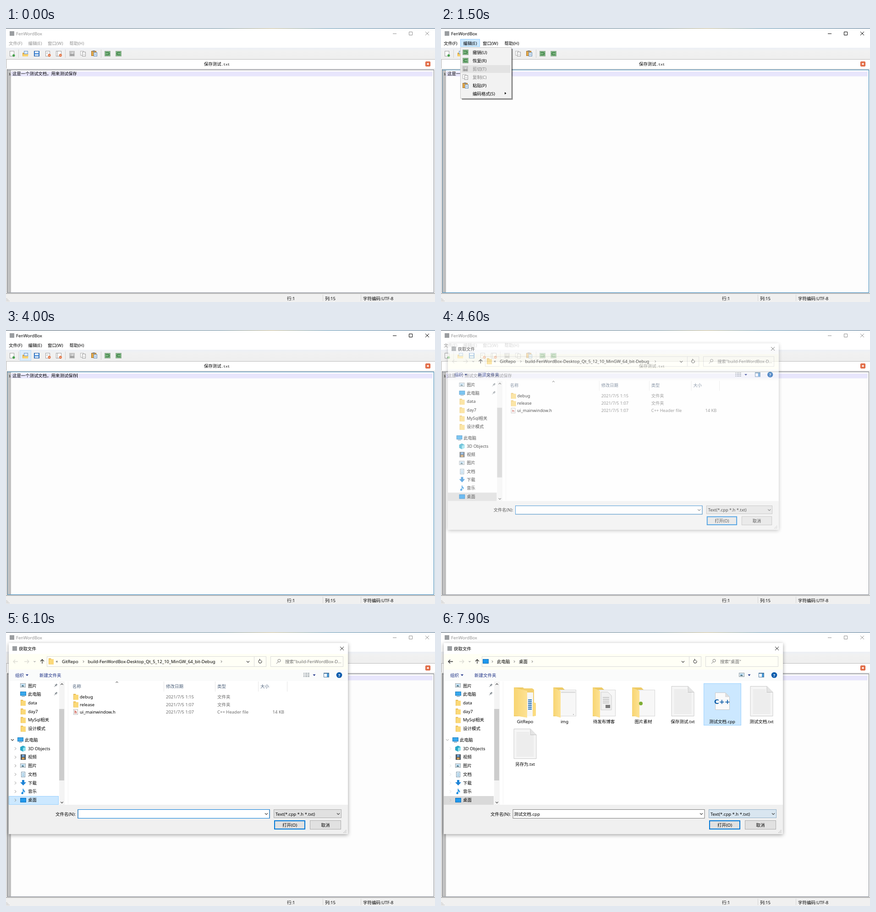
Write an HTML page that moves like this. It is 936 px wide and 598 px high and loops after 8 s.

```html
<!DOCTYPE html>
<html lang="zh-CN">
<head>
<meta charset="utf-8">
<title>FenWordBox</title>
<style>
html, body { margin: 0; width: 100%; height: 100%; overflow: hidden; background: #fff; }
svg { display: block; width: 936px; height: 598px; }
text { font: 9.5px "Noto Sans", "Noto Sans CJK SC", "Noto Sans CJK", sans-serif; white-space: pre; }
.sun { font: 9.4px "Noto Sans CJK SC", "Noto Sans CJK", sans-serif; font-weight: 500; }
.mono { font: 7.83px "Liberation Mono", monospace; }
.cpp { font: bold 14.5px "DejaVu Sans", sans-serif; }
#win { color: #929292; }
#frame { stroke: #828790; }
.active #win { color: #000; }
.active #frame { stroke: #2f80b4; }
#pick { fill: #d9d9d9; stroke: #d9d9d9; }
.picked #pick { fill: #cce8ff; stroke: #99d1ff; }
</style>
</head>
<body>
<script>
const LOOP = 8000;

// Drawing helpers: y of a text is the middle of its line
const text = (x, y, s, fill = '#000', extra = '') =>
  `<text x="${x}" y="${y + 3.5}" fill="${fill}" ${extra}>${s}</text>`;
const mid = (x, y, s, fill) => text(x, y, s, fill, 'text-anchor="middle"');
const rect = (x, y, w, h, fill, extra = '') =>
  `<rect x="${x}" y="${y}" width="${w}" height="${h}" fill="${fill}" ${extra}/>`;
const box = (x, y, w, h, fill, stroke, extra = '') =>
  rect(x + .5, y + .5, w - 1, h - 1, fill, `stroke="${stroke}" ${extra}`);
const path = (d, stroke, w = 1, fill = 'none') =>
  `<path d="${d}" stroke="${stroke}" stroke-width="${w}" fill="${fill}"/>`;
const shape = (d, fill) => `<path d="${d}" fill="${fill}"/>`;
const dot = (x, y, r, fill) => `<circle cx="${x}" cy="${y}" r="${r}" fill="${fill}"/>`;
const group = (id, body, extra = '') => `<g id="${id}" ${extra}>${body}</g>`;
const use = (id, x, y) => `<use href="#${id}" x="${x}" y="${y}"/>`;
const right = (x, y, c = '#555', r = 2.2) => path(`M${x - r / 2} ${y - r}l${r} ${r}l${-r} ${r}`, c);
const down = (x, y, c = '#444', r = 3) => path(`M${x - r} ${y - r / 2}l${r} ${r}l${r} ${-r}`, c, 1.1);
const up = (x, y, c = '#444', r = 3) => path(`M${x - r} ${y + r / 2}l${r} ${-r}l${r} ${r}`, c, 1.1);
const cross = (x, y, r, c, w = 1) => path(`M${x - r} ${y - r}l${2 * r} ${2 * r}m0 ${-2 * r}l${-2 * r} ${2 * r}`, c, w);
const caretDown = (x, y) => shape(`M${x - 3} ${y - 1.5}h6l-3 3.5z`, '#1e3287');
const grip = (x, y, flip) => [0, 1, 2].map(i => [0, 1, 2].map(j =>
  i + j > 1 ? rect(flip ? x + 4 - i * 2.5 : x + i * 2.5, y + j * 2.5, 1.3, 1.3, '#b0b0b0') : '').join('')).join('');

const symbol = (id, body) => `<g id="${id}">${body}</g>`;
const sheet = (x, y, w, h, stroke = '#a0a0a0') => box(x, y, w, h, '#fdfdfd', stroke);
const defs = '<defs>' +
  `<linearGradient id="edge"><stop offset="0" stop-color="#34475a"/><stop offset=".5" stop-color="#5a7f94"/>
   <stop offset=".62" stop-color="#b8ac80"/><stop offset=".75" stop-color="#4c86a8"/><stop offset="1" stop-color="#3a5f80"/></linearGradient>
   <linearGradient id="bar" x2="0" y2="1"><stop offset="0" stop-color="#edf0f6"/><stop offset=".3" stop-color="#f1f1f1"/><stop offset="1" stop-color="#eee"/></linearGradient>
   <linearGradient id="flap"><stop offset="0" stop-color="#f8d572"/><stop offset="1" stop-color="#fde294"/></linearGradient>
   <filter id="soft" x="-5%" y="-5%" width="110%" height="112%"><feDropShadow dx="0" dy="2" stdDeviation="4.5" flood-opacity=".36"/></filter>` +
  symbol('undo', box(0, 0, 13, 12, '#7db681', '#9aaf9b') + path('M2.5 3.5h5a2.5 2.5 0 0 1 0 5H2.5', '#3c7a45', 1.6)) +
  symbol('redo', box(0, 0, 13, 12, '#7db681', '#9aaf9b') + path('M10.5 3.5h-5a2.5 2.5 0 0 0 0 5h5', '#3c7a45', 1.6)) +
  symbol('cut', rect(0, 0, 12, 12, '#c3c3c3') + path('M8.5 2L5 7M5 3l3.5 4', '#eee') +
    `<g fill="none" stroke="#777"><circle cx="4" cy="8.7" r="1.5"/><circle cx="8.5" cy="8.7" r="1.5"/></g>`) +
  symbol('copy', sheet(0, 0, 8, 10, '#b4b4b4') + sheet(4, 2, 8, 10, '#999') + path('M6 6.5h4M6 8.5h4', '#ccc')) +
  symbol('paste', box(0, 1, 11, 11, '#e3a848', '#a87428') + rect(3, 0, 5, 3, '#888') + box(5, 4, 8, 9, '#dcebfa', '#6a8cb0') + path('M7 7.5h4M7 9.5h4', '#9bb6d2')) +
  symbol('folder', shape('M0 0h5l1 2h5v11H0z', '#e8bb52') + rect(1, 2, 10, 11, '#fbd978')) +
  symbol('pc', rect(0, 0, 13, 9, '#1979bd') + rect(1, 1, 11, 7, '#38a8ec') + rect(3, 10, 7, 1, '#48718c')) +
  symbol('pic', box(0, 0, 12, 9, '#f4f8fa', '#8a9aa4') + rect(2, 2, 8, 2.5, '#a9d3ef') + shape('M2 7l3-3l5 3z', '#3b6477')) +
  symbol('logo', rect(0, 1, 10, 10, '#9a9da0')) +
  '</defs>';

const toolIcons = () => {
  const page = x => sheet(x, 50, 10, 12);
  return page(8) + dot(16.8, 60, 2.7, '#46a04b') +
    shape('M36 54h5l1 1h6v7H36z', '#e5ae3f') + box(39, 50, 9, 7, '#d9e9f8', '#6b95c4') + shape('M36 62l2-5h11l-1.5 5z', '#fbd36f') +
    box(61, 50, 12, 12, '#3e86d8', '#2462ad') + rect(63, 51, 8, 4, '#e8f1fb') + rect(63, 57, 8, 4, '#cfe0f2') +
    page(86) + path('M88 54h5M88 56h3', '#bbb') + dot(94.5, 59.5, 3, '#e0632c') + rect(92.7, 59, 3.6, 1, '#fff') +
    sheet(109, 50, 7, 12) + sheet(112, 50, 9, 12) + dot(118.8, 59.5, 3, '#e0632c') + rect(117, 59, 3.6, 1, '#fff') +
    use('cut', 138, 50) + use('copy', 162, 50) + use('paste', 186, 49) + use('undo', 215, 50) + use('redo', 239, 50) +
    [27, 129, 207].map(x => rect(x, 47, 1, 18, '#d0d0d0')).join('');
};

const mainWindow = () =>
  rect(0, 0, 936, 598, '#fff') + rect(0, 0, 936, 1, 'url(#edge)') +
  rect(0, 43, 936, 26, 'url(#bar)') + rect(0, 68, 936, 1, '#bdbdbd') + rect(0, 69, 1, 20, '#aaa') +
  rect(0, 88, 936, 510, '#f0f0f0') +
  group('saveHover', box(55, 44, 24, 23, '#e0effb', '#bcdcf4')) +
  group('openHover', box(30, 44, 25, 23, '#dcecfa', '#bcdcf4')) + toolIcons() +
  group('editHover', box(42, 24, 43, 17, '#e5f3ff', '#cce8ff')) +
  group('editOpen', box(42, 24, 43, 17, '#cce8ff', '#99d1ff')) +
  use('logo', 8, 6) +
  group('win', text(22, 12, 'FenWordBox', 'currentColor') +
    [[6, '文件(F)'], [48.5, '编辑(E)'], [91, '窗口(W)'], [138.5, '帮助(H)']].map(([x, s]) => text(x, 33.5, s, 'currentColor')).join('') +
    path('M844 12.5h8M879.5 8.5h7v7h-7z', 'currentColor') + cross(919, 12, 4, 'currentColor')) +
  `<text class="sun" x="432" y="82">保存测试<tspan class="mono">.txt</tspan></text>` +
  rect(915, 73, 11, 11, '#e0663f', 'rx="2"') + cross(920.5, 78.5, 2.3, '#fff', 1.5) +
  `<rect id="frame" x="3" y="91.5" width="930.5" height="486" fill="#fdfdfd"/>` +
  rect(2, 90, 932, 1, '#c9c9c9') + rect(2, 90, 1, 488, '#777') + rect(4, 92, 7, 485, '#c0c0c0') +
  rect(11, 95, 920, 10.5, '#e8e6fc') +
  '<text class="mono" x="5.8" y="103">1</text><text class="sun" x="14" y="103.3">这是一个测试文档，用来测试保存</text>' +
  group('caret', rect(155, 95, 1, 9, '#000')) +
  rect(0, 579, 936, 1, '#8b8b8b') + rect(691, 582, 1, 14, '#d5d5d5') + rect(774, 582, 1, 14, '#d5d5d5') +
  text(613, 590, '行:1') + text(696, 590, '列:15') + text(779, 590, '字符编码:UTF-8') + grip(2, 590, true);

const panel = (x, y, w, h) =>
  rect(x + 4, y + 4, w - 1, h - 1, '#000', 'opacity=".2"') + rect(x + 3, y + 3, w - 1, h - 1, '#000', 'opacity=".35"') +
  box(x, y, w, h, '#f2f2f2', '#ccc');

const menus = () => {
  const items = [['撤销(U)', 'undo'], ['恢复(R)', 'redo'], ['剪切(T)', 'cut'], ['复制(C)', 'copy'], ['粘贴(P)', 'paste'], ['编码格式(S)']];
  const rows = items.map(([s, icon], i) => {
    const y = 53 + i * 18;
    return (icon ? use(icon, 47, y - 6) : '') + text(69, y, s, i === 2 || i === 3 ? '#858585' : '#000');
  }).join('');
  return group('menu', panel(42, 42, 112, 112) +
    group('cutRow', rect(44, 81, 107, 17, '#e3e3e3')) +
    group('pasteRow', rect(44, 116, 107, 18, '#91c9f7')) +
    group('codeRow', rect(44, 134, 107, 17, '#91c9f7')) +
    rows + shape('M139 140l3.5 2.5l-3.5 2.5z', '#000')) +
    group('submenu', panel(149, 132, 82, 39) + group('utfRow', rect(151, 134, 77, 17, '#91c9f7')) +
      text(176, 143, 'UTF-8') + text(176, 160.5, 'GB2312'));
};

const tree = () => {
  const rows = [['图片', 'pic', 117], ['此电脑', 'pc', 135], ['data', 'folder', 154], ['day7', 'folder', 173],
    ['MySql相关', 'folder', 191.5], ['设计模式', 'folder', 210.5]]
    .map(([s, k, y], i) => use(k, i < 2 ? 31 : 32, y - (k === 'folder' ? 6 : 5)) + text(48, y, s) +
      (i < 2 ? path(`M105 ${y + 3}l3-3`, '#7d858c') + shape(`M106 ${y - 1.5}l2-.5l2-2.5l2.5 2.5l-2.500 2l-.5 2z`, '#8d949a') : '')).join('');
  const names = ['3D Objects', '视频', '图片', '文档', '下载', '音乐', '桌面'];
  const rowY = i => 254 + i * 18.75;
  return '<rect id="pick" x="6.5" y="358.5" width="108" height="18"/>' + rect(6, 0, 109, 18.5, '#e5f3ff', 'id="hover"') + rows +
    use('pc', 25, 230) + text(41, 235.5, '此电脑') + names.map((s, i) => text(48, rowY(i), s)).join('') +
    shape('M31 251l6-3l6 3v7l-6 3l-6-3z', '#2aa8c9') + shape('M37 253l6-2v7l-6 3z', '#8fe0ee') +
    rect(32, 267, 11, 12, '#444f58') + rect(34.5, 268, 6, 4.5, '#6fa3d8') + rect(34.5, 274, 6, 4, '#d39d54') +
    use('pic', 31, 287) + sheet(33, 305, 9, 12, '#6f91a9') + path('M35 308.5h5M35 311.5h5M35 314h5', '#3d96cf') +
    shape('M35 323h5v5h4l-6.5 7l-6.5-7h4z', '#1f84d6') +
    shape('M36.5 342h1.5q0 3 3.5 5q0 3-1.5 4q.5-2.5-2-3.5v4a2.3 2.3 0 1 1-1.5-2z', '#1f8ee0') +
    rect(31, 362, 13, 10, '#1470b8') + rect(32, 363, 11, 8, '#1f98ec') +
    group('arrows', down(14, 235.5, '#333') + names.map((s, i) => right(20.5, rowY(i) + .5, '#8a8a8a', 3)).join('')) +
    rect(116, 108, 12, 269, '#f4f4f4') + rect(116, 168, 11, 156, '#cdcdcd') + up(122, 114, '#444', 2.7) + down(122, 372, '#444', 2.7);
};

const details = () => {
  const gray = '#6d6d6d', head = '#4c607a';
  return [[145, '名称'], [349, '修改日期'], [461, '类型'], [555, '大小']].map(([x, s]) => text(x, 118, s, head)).join('') +
    [344, 456, 550, 613].map(x => rect(x, 108, 1, 22, '#e5e5e5')).join('') + up(242, 109.5, '#777', 2.5) +
    [['debug', '1:15', '文件夹', 141.5], ['release', '1:07', '文件夹', 158], ['ui_mainwindow.h', '1:07', 'C++ Header file', 174.5]]
      .map(([s, time, kind, y], i) => (i < 2 ? use('folder', 147, y - 6.5) :
        sheet(147, y - 6, 10, 12, '#b5b5b5') + text(149.3, y, 'h', '#c0392b', 'style="font-size:8px;font-weight:700"')) +
        text(161, y, s) + text(349, y, '2021/7/5 ' + time, gray) + text(461, y, kind, gray)).join('') +
    text(607, 174.5, '14 KB', gray, 'text-anchor="end"');
};

const bigPage = (x, y) => path(`M${x + .5} ${y + .5}h36l13 13v52h-49z`, '#cbcbcb', 1, '#f5f5f5') +
  path(`M${x + 36.5} ${y + .5}v13h13`, '#c8c8c8', 1, '#e4e4e4') +
  Array.from({ length: 18 }, (_, i) => rect(x + 6, y + 8 + i * 3, i < 2 ? 28 : 38, 1, '#dedede')).join('');
// Open folder: back panel, contents, then the front flap
const bigFolder = (cx, inside, flap = 16) => {
  const x = cx - 24;
  return shape(`M${x} 121h20l5 5v58H${x}z`, '#eecb66') + inside(x) +
    shape(`M${x} 121.5l${flap} 7v58.5l${-flap}-5z`, 'url(#flap)');
};
const icons = () => {
  const page = x => box(x + 13, 126, 37, 58, '#f7f7f7', '#d6d6d6');
  const names = ['GitRepo', 'img', '待发布博客', '图片素材', '保存测试.txt', '测试文档.cpp', '测试文档.txt'];
  return bigFolder(183, x => shape(`M${x + 18} 123h22l4 3v58h-26z`, '#f3d070') + rect(x + 28, 132, 14, 52, '#f6f6f6') +
      [0, 1, 2, 3, 4, 5].map(i => rect(x + 31, 147 + i * 4, 8, 2.5, '#3a7fc0')).join('') +
      shape(`M${x + 41} 153l7 2v28l-7 1z`, '#fbdc80'), 29) +
    bigFolder(269, x => page(x) + rect(x + 17, 130, 31, 3, '#ddd') + dot(x + 44, 180, 1, '#aaa')) +
    bigFolder(355, x => page(x) + path(`M${x + 18} 131h15l8 8v31H${x + 18}z`, '#ccc', 1, '#f0f0f0') +
      [0, 1, 2, 3].map(i => rect(x + 22, 142 + i * 4, 14, 1.5, '#bbb')).join('') + rect(x + 28, 159, 10, 7, '#7d7d7d')) +
    bigFolder(441, page) + dot(436, 156, 4, '#7fae35') +
    bigPage(502.5, 118) + bigPage(674.5, 118) + bigPage(158.5, 211) +
    group('cppHover', rect(573, 112, 82, 92, '#e5f3ff')) + group('cppPick', box(573, 112, 82, 92, '#cce8ff', '#99d1ff')) +
    path('M598.5 132.5h22l9 9v28h-31z', '#c8c8c8', 1, '#fafafa') + shape('M620 132.5l9.5 9.5h-9.5z', '#ddd') +
    '<text class="cpp" x="613.5" y="156.5" fill="#0b5ca8" text-anchor="middle">C++</text>' +
    names.map((s, i) => mid(183.5 + i * 86, 195.5, s)).join('') + mid(183.5, 288.5, '另存为.txt');
};

const button = (x, w, s, main) => (main ? rect(x + 1, 412, w - 2, 18, '#e1e1e1', 'stroke="#0078d7" stroke-width="2"') :
  box(x, 411, w, 20, '#e1e1e1', '#adadad')) + mid(x + w / 2, 421, s);
const arrow = (x, dir, c) => path(`M${x - 5} 64.5h10M${x + dir} 60.5l${4 * dir} 4l${-4 * dir} 4`, c, 1.3);
const nameBox = (fill, stroke) => box(156.5, 387, 419, 20, fill, stroke);

const dialog = () => group('dialog',
  rect(6, 24, 740, 417, '#fff', 'filter="url(#soft)"') + rect(6, 48, 740, 34, '#fffff4') +
  rect(6, 82, 740, 25, '#fafbfb') + rect(6, 377, 740, 64, '#f0f0f0') +
  use('logo', 14, 30) + text(28, 36.5, '获取文件') + cross(733, 36, 4, '#222') +
  arrow(21, -1, '#dcdcd4') + group('back', arrow(21, -1, '#333')) + arrow(45, 1, '#dcdcd4') + down(62.5, 64.5, '#aaa', 2) +
  path('M79 69v-9m-4 4l4-4l4 4', '#333', 1.3) +
  box(89, 53, 479, 23, '#fffff6', '#d9d9d9') + rect(541, 53, 1, 23, '#d9d9d9') + box(577, 53, 159, 23, '#fffff6', '#d9d9d9') +
  down(528, 65, '#444', 3) + path('M557.5 62.5a3.5 3.5 0 1 1-4-1.5m0-2.5v3h3', '#444', 1.1) +
  `<circle cx="596" cy="62.5" r="3" fill="none" stroke="#777"/>` + path('M594 65l-4 4', '#777') +
  group('repoPath', use('folder', 93, 57.5) + text(108.5, 63.5, '«', '#333') + text(122, 64, 'GitRepo') + right(169, 64.5) +
    text(178.5, 64, 'build-FenWordBox-Desktop_Qt_5_12_10_MinGW_64_bit-Debug') + right(470, 64.5) +
    text(609, 64.5, '搜索"build-FenWordBox-D...', '#6d6d6d')) +
  group('deskPath', rect(91, 59, 13, 10, '#1470b8') + rect(92, 60, 11, 8, '#1f98ec') + right(112, 64.5) + text(122, 64, '此电脑') +
    right(160, 64.5) + text(170, 64, '桌面') + right(199, 64.5) + text(609, 64.5, '搜索"桌面"', '#6d6d6d')) +
  text(20, 94.5, '组织', '#1e3287') + caretDown(46, 94) + text(73, 94.5, '新建文件夹', '#1e3287') +
  group('listIcon', [90, 93.5, 97].map(y => [649, 653, 658].map((x, i) => rect(x, y - .5, i ? 4 : 2.5, 1.4, '#7c8790')).join('')).join('')) +
  group('picIcon', use('pic', 650, 89)) + caretDown(672.5, 94) +
  box(693, 89, 12, 10, '#fff', '#4a78a0') + rect(700, 90, 4, 8, '#4a9ad8') + rect(693, 89, 12, 2, '#4a78a0') +
  dot(727, 94, 6.3, '#0a5cad') + text(727, 94.3, '?', '#fff', 'text-anchor="middle" style="font-weight:700"') +
  tree() + rect(135, 108, 1, 268, '#f3f3f3') + group('details', details()) + group('icons', icons()) +
  text(108, 397, '文件名(N):') + nameBox('#fff', '#7a7a7a') + group('focus', nameBox('none', '#0078d7')) +
  group('dlgCaret', rect(160, 390, 1, 14, '#000')) + group('fileName', text(159, 397.5, '测试文档.cpp')) + down(568, 397, '#444', 3) +
  box(584, 387, 148, 19, '#e1e1e1', '#adadad') + group('comboHover', box(584, 387, 148, 19, '#d8e8f4', '#8fb4d0')) +
  text(588, 397, 'Text(*.cpp *.h *.txt)') + down(725, 397, '#444', 3) +
  button(585, 68, '打开(O)', true) + button(663, 68, '取消') + grip(736, 432));

document.body.innerHTML = `<svg viewBox="0 0 936 598">${defs}${mainWindow()}${menus()}${dialog()}</svg>`;

// Opacity steps: [ms, value], held until the next step
const ramp = (t0, t1, a, b) => {
  const n = (t1 - t0) / 100;
  return Array.from({ length: n + 1 }, (_, i) => [t0 + i * 100, a + (b - a) * i / n]);
};
const tracks = {
  saveHover: [[700, 1], [900, 0]],
  editHover: [[900, 1], [1100, 0]],
  editOpen: [[1100, 1], [3100, 0]],
  menu: [...ramp(1100, 1300, .35, 1), [3100, 0]],
  cutRow: [[1500, 1], [1700, 0]],
  pasteRow: [[1700, 1], [1900, 0]],
  codeRow: [[1900, 1]],
  submenu: [[2100, .5], [2200, 1], [3100, 0]],
  utfRow: [[2400, 1]],
  caret: [[3100, 1], [3500, 0], [4000, 1], [4500, 0]],
  openHover: [[3700, 1], [4300, 0]],
  dialog: [[4500, .25], [4600, .65], [4700, .92], [4800, 1]],
  dlgCaret: [[4800, 1], [5300, 0], [5800, 1], [6100, 0]],
  arrows: [...ramp(5100, 5800, .12, 1), ...ramp(7300, 7900, .9, .3)],
  hover: [[5100, 1], [5800, 0]],
  repoPath: [[0, 1], [6200, 0]],
  deskPath: [[6200, 1]],
  back: [[6200, 1]],
  details: [[0, 1], [6200, 0]],
  listIcon: [[0, 1], [6300, 0]],
  picIcon: [[6300, 1]],
  icons: [[6300, .6], [6400, 1]],
  focus: [[0, 1], [6200, 0]],
  cppHover: [[7000, 1], [7300, 0]],
  cppPick: [[7300, 1]],
  fileName: [[7300, 1]],
  comboHover: ramp(7500, 7900, .1, .8)
};
const hoverRows = [[5100, 145], [5200, 164], [5300, 182], [5400, 226], [5500, 264], [5600, 301], [5700, 339]];

const held = (steps, t, first = 0) => steps.reduce((v, [at, next]) => at <= t ? next : v, first);
const $ = id => document.getElementById(id);
const nodes = Object.keys(tracks).map(id => [$(id), tracks[id]]);
const svg = document.querySelector('svg'), hover = $('hover'), dlg = $('dialog');

function draw(t) {
  for (const [el, steps] of nodes) {
    const v = held(steps, t);
    el.style.opacity = v;
    el.style.display = v ? '' : 'none';
  }
  svg.classList.toggle('active', t >= 1100 && t < 4500);
  svg.classList.toggle('picked', t >= 5800 && t < 7300);
  hover.setAttribute('y', held(hoverRows, t, 145));
  const k = held([[4500, .94], [4600, .975], [4700, .995], [4800, 1]], t, 1);
  dlg.setAttribute('transform', `translate(${376 * (1 - k)} ${232 * (1 - k)}) scale(${k})`);
}

const start = performance.now();
function tick() {
  draw((performance.now() - start) % LOOP);
  requestAnimationFrame(tick);
}
tick();
</script>
</body>
</html>
```
